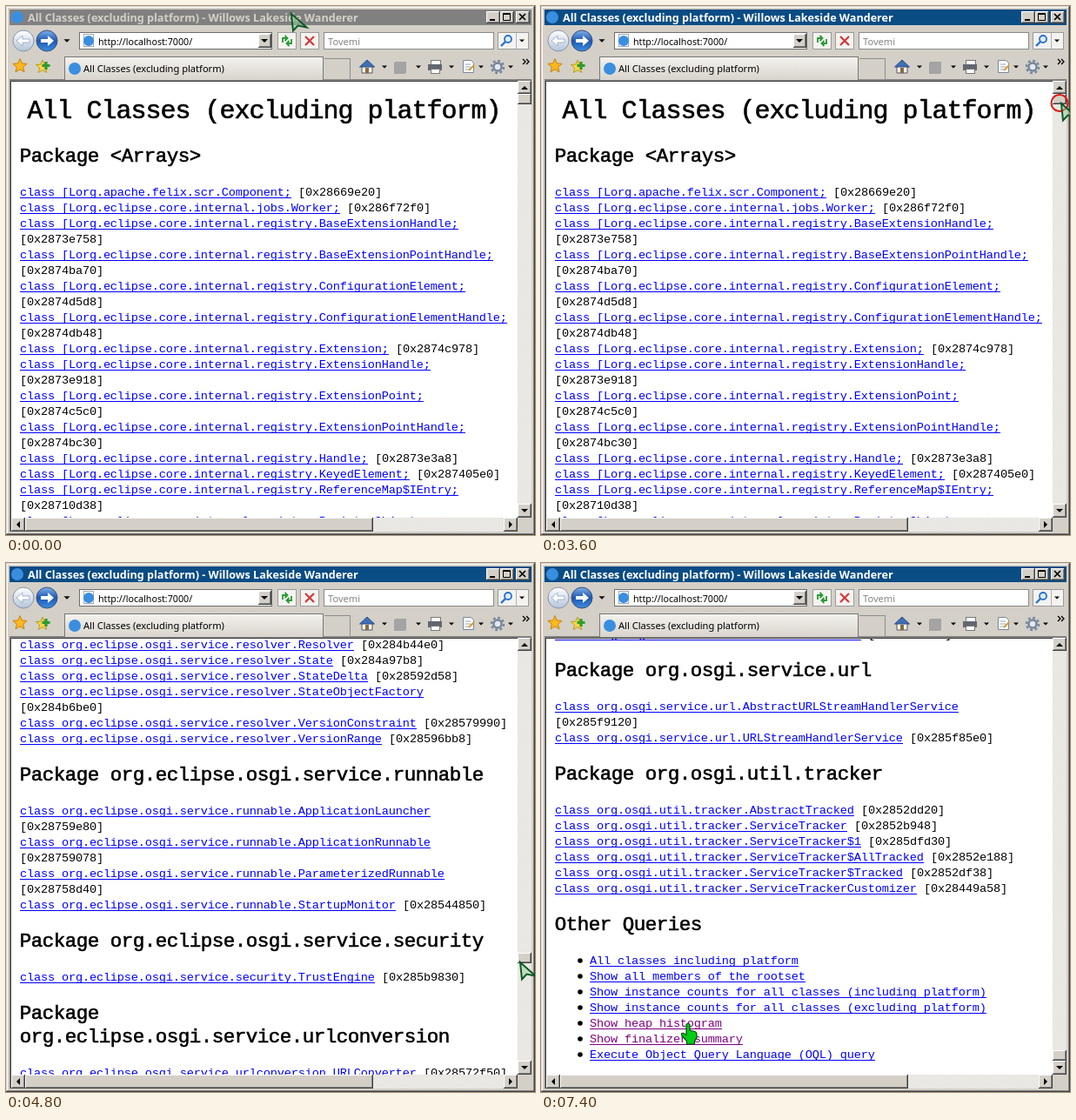
These frames come from a looping animation (608 px wide and 608 px high, 8 s). An HTML page:

```html
<!DOCTYPE html>
<html lang="en">
<head>
<meta charset="utf-8">
<title>All Classes</title>
<style>
  html, body { margin: 0; width: 100%; height: 100%; overflow: hidden; background: #d4d0c8; }
  svg { display: block; }
  #stage { width: 608px; height: 608px; }
  rect { shape-rendering: crispEdges; }
  text { white-space: pre; }
  .ui { font-family: "Noto Sans", "Open Sans", sans-serif; font-size: 11.1px; }
  .doc text { font-family: "Liberation Mono", monospace; }
</style>
</head>
<body>
<svg id="stage" viewBox="0 0 608 608" xmlns="http://www.w3.org/2000/svg">
  <defs>
    <linearGradient id="tab" x2="0" y2="1"><stop stop-color="#f4f2ee"/><stop offset="1" stop-color="#d8d4cc"/></linearGradient>
    <linearGradient id="pale" x2="0" y2="1"><stop stop-color="#fff"/><stop offset="1" stop-color="#b4c4da"/></linearGradient>
    <linearGradient id="blue" x2="0" y2="1"><stop stop-color="#7fb0ea"/><stop offset=".5" stop-color="#1d56b4"/><stop offset="1" stop-color="#3d8fe0"/></linearGradient>
    <pattern id="track" width="2" height="2" patternUnits="userSpaceOnUse">
      <rect width="2" height="2" fill="#fff"/><rect width="1" height="1" fill="#d4d0c8"/><rect x="1" y="1" width="1" height="1" fill="#d4d0c8"/>
    </pattern>
    <clipPath id="view"><rect x="6" y="87" width="582" height="501"/></clipPath>
    <clipPath id="strip"><rect x="6" y="415" width="582" height="173"/></clipPath>
  </defs>
</svg>
<script>
const stage = document.getElementById('stage');
const FACE = '#d4d0c8';

// Markup helpers
const rect = (x, y, w, h, fill, more = '') =>
  `<rect x="${x}" y="${y}" width="${w}" height="${h}" fill="${fill}" ${more}/>`;
const path = (d, fill, stroke = 'none', w = 1) =>
  `<path d="${d}" fill="${fill}" stroke="${stroke}" stroke-width="${w}"/>`;
const disc = (x, y, r, fill, stroke = 'none', w = 1) =>
  `<circle cx="${x}" cy="${y}" r="${r}" fill="${fill}" stroke="${stroke}" stroke-width="${w}"/>`;
const box = (x, y, w, h, fill, line) => rect(x, y, w, h, line) + rect(x + 1, y + 1, w - 2, h - 2, fill);
const label = (x, y, s, more = '') => `<text class="ui" x="${x}" y="${y}" ${more}>${s}</text>`;
const raised = (x, y, w, h) => rect(x, y, w, h, '#404040') + rect(x, y, w - 1, h - 1, '#fff') +
  rect(x + 1, y + 1, w - 2, h - 2, '#808080') + rect(x + 1, y + 1, w - 3, h - 3, FACE);
const tri = (x, y, dx, dy, r = 4) => dy
  ? path(`M${x - r} ${y - dy * r / 2}h${2 * r}l${-r} ${dy * r}z`, '#000')
  : path(`M${x - dx * r / 2} ${y - r}v${2 * r}l${dx * r} ${-r}z`, '#000');
const star = (x, y, r, fill, line) => {
  let d = '';
  for (let i = 0; i < 10; i++) {
    const a = i * Math.PI / 5, q = i % 2 ? r * .45 : r;
    d += (i ? 'L' : 'M') + (x + q * Math.sin(a)).toFixed(1) + ' ' + (y - q * Math.cos(a)).toFixed(1);
  }
  return path(d + 'z', fill, line);
};

// Document: package, class prefix, suffix, "Name address" list
const sections = [
  ['<Arrays>', '[Lorg.', ';', `apache.felix.scr.Component 28669e20,eclipse.core.internal.jobs.Worker 286f72f0,
    @BaseExtensionHandle 2873e758,@BaseExtensionPointHandle 2874ba70,@ConfigurationElement 2874d5d8,
    @ConfigurationElementHandle 2874db48,@Extension 2874c978,@ExtensionHandle 2873e918,
    @ExtensionPoint 2874c5c0,@ExtensionPointHandle 2874bc30,@Handle 2873e3a8,@KeyedElement 287405e0,
    @ReferenceMap$IEntry 28710d38,@RegistryObject`.replaceAll('@', 'eclipse.core.internal.registry.')],
  ['org.eclipse.core.internal.preferences', , '', `AbstractScope 28696700,Activator 28697dd8,
    BundleDefaultPreferences 286b2d50,ConfigurationPreferences 286b8fd8,DefaultPreferences 286b5cc0,
    EclipsePreferences 286acef8,ImmutableMap 286b0740,ImmutableMap$ArrayMap 286b1628,
    ImmutableMap$EmptyMap 286b1e48,InstancePreferences 286b7ca8,OSGiPreferencesServiceManager 286ba608,
    PreferenceServiceRegistryHelper 2874a528,PreferenceServiceRegistryHelper$1 2874af60`],
  ['org.eclipse.osgi.service.resolver', , '', `Resolver 284b44e0,State 284a97b8,StateDelta 28592d58,
    StateObjectFactory 284b6be0,VersionConstraint 28579990,VersionRange 28596bb8`],
  ['org.eclipse.osgi.service.runnable', , '', `ApplicationLauncher 28759e80,ApplicationRunnable 28759078,
    ParameterizedRunnable 28758d40,StartupMonitor 28544850`],
  ['org.eclipse.osgi.service.security', , '', 'TrustEngine 285b9830'],
  ['org.eclipse.osgi.service.urlconversion', , '', 'URLConverter 28572f50'],
  ['org.osgi.service.prefs', , '', 'PreferencesService 280b90d0'],
  ['org.osgi.service.startlevel', , '', 'StartLevel 284f9620'],
  ['org.osgi.service.url', , '', 'AbstractURLStreamHandlerService 285f9120,URLStreamHandlerService 285f85e0'],
  ['org.osgi.util.tracker', , '', `AbstractTracked 2852dd20,ServiceTracker 2852b948,ServiceTracker$1 285dfd30,
    ServiceTracker$AllTracked 2852e188,ServiceTracker$Tracked 2852df38,ServiceTrackerCustomizer 28449a58`]
];
const queries = ['All classes including platform', 'Show all members of the rootset',
  'Show instance counts for all classes (including platform)',
  'Show instance counts for all classes (excluding platform)',
  'Show heap histogram', 'Show finalizer summary', 'Execute Object Query Language (OQL) query'];

function buildDoc() {
  const LEFT = 16, COLS = 70, LINE = 18, GAP = 41.5;
  let out = '', y = 130;
  const mono = (x, base, s, size, adv, more = '') => {
    const ls = adv - .6 * size;
    out += `<text x="${x + ls / 2}" y="${base}" font-size="${size}" letter-spacing="${ls.toFixed(3)}" ` +
      `${more}>${s.replace(/</g, '&lt;')}</text>`;
  };
  const title = (x, base, s, size, adv) => mono(x, base, s, size, adv, 'stroke="#000" stroke-width=".6"');
  const body = (x, s, fill = '#000') => mono(x, y + 5, s, 13.6, 8, `fill="${fill}"`);
  const link = (x, s, fill = '#0000ff') => {
    body(x, s, fill);
    out += rect(x, y + 7, s.length * 8, 1, fill);
  };
  const heading = lines => {
    y += GAP;
    lines.forEach((s, i) => {
      if (i) y += 27;
      title(LEFT, Math.round(y + 7.5), s, 22.5, 13);
    });
    y += GAP;
  };
  title(25, 129, 'All Classes (excluding platform)', 30, 17);
  for (const [pkg, prefix = pkg + '.', suffix, list] of sections) {
    const name = 'Package ' + pkg;
    heading(name.length * 13 > 562 ? ['Package', pkg] : [name]);
    for (const item of list.split(',')) {
      const [cls, addr] = item.trim().split(' ');
      let s = 'class ' + prefix + cls + suffix;
      if (s.length > COLS) {
        link(LEFT, 'class');
        y += LINE;
        s = s.slice(6);
      }
      link(LEFT, s);
      if (addr) {
        const wrap = s.length + 13 > COLS;
        if (wrap) y += LINE;
        body(wrap ? LEFT : LEFT + s.length * 8 + 8, `[0x${addr}]`);
      }
      y += LINE;
    }
    y -= LINE;
  }
  heading(['Other Queries']);
  queries.forEach((q, i) => {
    out += disc(45, y + 1, 2.8, '#000');
    link(56, q, i === 4 || i === 5 ? '#800080' : undefined);
    y += LINE;
  });
  return out;
}

function buildChrome() {
  let s = rect(0, 0, 608, 608, FACE) + rect(1, 1, 606, 1, '#fff') + rect(1, 1, 1, 606, '#fff') +
    rect(606, 1, 1, 606, '#808080') + rect(1, 606, 606, 1, '#808080') +
    rect(607, 0, 1, 608, '#404040') + rect(0, 607, 608, 1, '#404040');
  // Title bar
  s += rect(4, 4, 600, 18, '#808080', 'id="title"') + disc(13, 13, 7, '#3a8ee0') +
    label(25, 17.5, 'All Classes (excluding platform) - Willows Lakeside Wanderer',
      'id="caption" style="font-size:12.6px;font-weight:700"');
  s += raised(552, 6, 16, 14) + rect(556, 15, 6, 2, '#000');
  s += raised(568, 6, 16, 14) + path('M571.5 8.5h8v8h-8zM571 9.5h9', 'none', '#000');
  s += raised(586, 6, 16, 14) + path('M590 9l7 7M597 9l-7 7', 'none', '#000', 1.7);
  // Address row
  s += disc(20, 40, 12, 'url(#pale)', '#8794a8') + path('M12 40l7-6v4h8v4h-8v4z', '#fff', '#8fa3c0', .8);
  s += disc(47, 40, 12, 'url(#blue)', '#3a4f78') + path('M55 40l-7-6v4h-8v4h8v4z', '#fff');
  s += tri(70, 40, 0, 1, 3.5);
  s += box(84, 30, 222, 20, '#fff', '#6d6d6d') + box(89, 32, 12, 15, '#fff', '#a0a8b4') + disc(95, 40, 6, '#3a8ee0') +
    label(106, 44.5, 'http://localhost:7000/', 'style="font-size:10.7px"') + raised(290, 32, 15, 16) + tri(297, 40, 0, 1);
  s += box(312, 30, 22, 20, '#f4f3f0', '#9a9a9a') +
    path('M318 42v-5h5M320.500 34l3 3-3 3M328 38v5h-5M325.500 46l-3-3 3-3', 'none', '#2a9a36', 1.8);
  s += box(338, 30, 22, 20, '#f4f3f0', '#9a9a9a') + path('M344 35l10 10M354 35l-10 10', 'none', '#d0393c', 2.2);
  s += box(365, 30, 196, 20, '#fff', '#8a8a8a') + label(370, 44.5, 'Tovemi', 'fill="#858585"');
  s += box(565, 30, 36, 20, '#f4f3f0', '#9a9a9a') + rect(586, 31, 1, 18, '#b4b4b4') +
    disc(577, 38, 4, '#dcecff', '#2b70cc', 1.8) + path('M574 41l-5 5', 'none', '#2b70cc', 2.4) + tri(593, 40, 0, 1, 3);
  // Tab row
  s += star(16, 69, 8.5, '#ffb81c', '#c98208') + star(42, 70, 8, '#ffd24a', '#b4a020') +
    path('M46 64v9M41.500 68.500h9', 'none', '#2c9c2c', 3.2);
  s += rect(4, 84, 600, 1, '#808080') + rect(67, 58, 298, 27, '#777') + rect(68, 59, 296, 26, 'url(#tab)') +
    rect(366, 60, 30, 25, '#8c8c8c') + rect(366, 61, 29, 23, FACE) +
    disc(79, 72, 7, '#3a8ee0') + label(89, 76, 'All Classes (excluding platform)');
  s += path('M409 69v8h12v-8', '#f5f3ee', '#556') + path('M406.500 70l8.500-8 8.500 8z', '#3f6fb5', '#2c4a7c') +
    rect(413, 71, 4, 6, '#8b6a3c');
  s += '<rect x="446" y="64" width="14" height="14" rx="2" fill="#a4a4a4"/>';
  s += rect(488, 62, 11, 6, '#fff', 'stroke="#777"') + rect(485, 67, 16, 7, '#62666e') +
    rect(488, 72, 10, 5, '#fff', 'stroke="#777"');
  s += path('M525.500 62.500h9l3 3v11h-12z', '#fff', '#7a8799') + path('M528 67h6M528 70h6M528 73h4', 'none', '#8aa0c0') +
    path('M532 74l6-6', 'none', '#d59a2c', 2);
  s += `<circle cx="565" cy="70" r="7" fill="none" stroke="#75859c" stroke-width="2.5" stroke-dasharray="2.75"/>` +
    disc(565, 70, 4.5, '#e4e8ee', '#75859c', 2.5);
  for (const x of [435, 474, 512, 546, 580]) s += tri(x, 70, 0, 1, 3);
  s += path('M594 61l3 3-3 3M598 61l3 3-3 3', 'none', '#000', 1.3);
  // Page frame and scroll bars
  s += rect(4, 85, 600, 519, '#808080') + rect(5, 86, 599, 518, '#404040') + rect(6, 87, 582, 501, '#fff');
  s += rect(588, 86, 16, 502, 'url(#track)') + raised(588, 86, 16, 15) + tri(596, 94, 0, -1) +
    raised(588, 572, 16, 16) + tri(596, 580, 0, 1);
  s += rect(6, 588, 582, 16, 'url(#track)') + raised(6, 588, 16, 16) + tri(14, 596, -1, 0) +
    raised(572, 588, 16, 16) + tri(580, 596, 1, 0) + raised(22, 588, 400, 16) + rect(588, 588, 16, 16, FACE);
  return s + `<g id="thumb">${raised(588, 0, 16, 12)}</g>`;
}

const arrow = path('M1 1L3 20.500L8.500 14.500L18.500 16.500z', 'rgba(150,205,155,.5)', '#0c5a22', 2);
const hand = path('M-2 11V1.500q2-3 4 0V8l6 1.500q2 .5 2 3V17l-2.500 3v4h-9v-3.500l-6-7q-.5-3 2.500-2l3 2z', '#00cc14', '#064d0c', 1.2);

stage.innerHTML += buildChrome() + `
  <g clip-path="url(#view)"><g class="doc" id="page">${buildDoc()}</g></g>
  <g id="stale" clip-path="url(#strip)">${rect(6, 415, 582, 173, '#fff')}</g>
  <g id="ring">${disc(596, 111.500, 9.5, 'none', '#e01414', 2)}</g>
  <g id="arrow">${arrow}</g><g id="hand">${hand}</g>`;

const part = id => document.getElementById(id);
const [page, stale, thumb, ring, title, caption] =
  ['page', 'stale', 'thumb', 'ring', 'title', 'caption'].map(part);
const cursors = { arrow: part('arrow'), hand: part('hand') };

// Lower strip that has not been repainted yet after a fast scroll
const old = page.cloneNode(true);
old.removeAttribute('id');
old.setAttribute('transform', 'translate(0 -1551)');
stale.append(old);

// time, pointer x, pointer y, scroll, thumb top (last two carry over when absent)
const steps = [
  [0, 327, 8, 0, 101], [1000, 322, 70], [1200, 322, 136], [1400, 328, 200],
  [1800, 333, 250], [2000, 355, 287], [2200, 425, 255], [2400, 525, 180], [2600, 604, 108],
  [2800, 607, 109], [3000, 602, 109], [3200, 597, 109], [3600, 597, 111],
  [3800, 597, 134, 285, 124], [4000, 597, 158, 569, 148],
  [4400, 595, 258, 760, 248], [4600, 592, 358, 950, 348], [4800, 590, 458, 1141, 448],
  [5400, 590, 563, 1551, 558], [5800, 590, 567, 1724, 560], [6000, 590, 573, 1811, 560],
  [6400, 560, 572], [6600, 480, 565], [6800, 390, 558], [7000, 300, 550], [7200, 236, 541], [7400, 169, 529]
];
steps.forEach((s, i) => { for (const k of [3, 4]) s[k] ??= steps[i - 1][k]; });

const move = (el, x, y) => el.setAttribute('transform', `translate(${x} ${y})`);
const show = (el, on) => el.setAttribute('visibility', on ? 'visible' : 'hidden');

function draw(now) {
  const t = now % 8000;
  const [at, x, y, scroll, top] = steps.findLast(s => s[0] <= t);
  const focused = t >= 3600, pointing = at === 7400;
  move(page, 0, -scroll);
  move(thumb, 0, top);
  move(cursors.arrow, x, y);
  move(cursors.hand, x, y);
  show(cursors.arrow, !pointing);
  show(cursors.hand, pointing);
  show(ring, at === 3600);
  show(stale, at === 5800);
  title.setAttribute('fill', focused ? '#0a4c84' : '#808080');
  caption.setAttribute('fill', focused ? '#fff' : FACE);
}

const start = performance.now();
function tick() {
  draw(performance.now() - start);
  requestAnimationFrame(tick);
}
tick();
</script>
</body>
</html>
```
